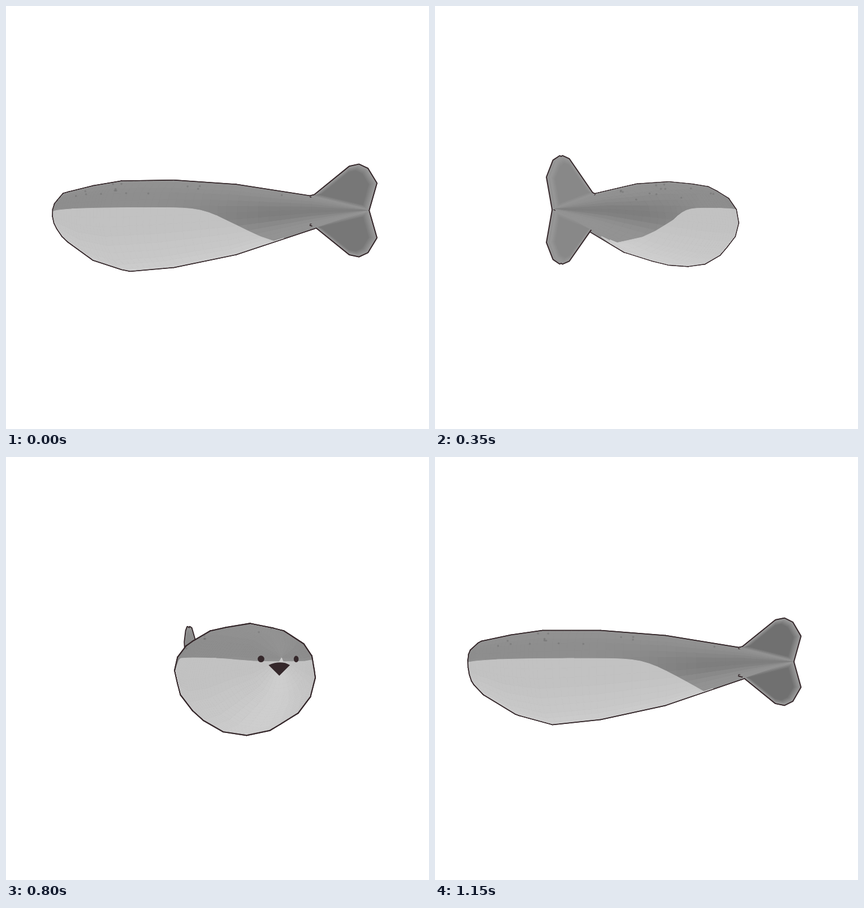
Recreate the animation shown at these times as an HTML page with a canvas. Size 748 by 748 pixels, loop 1200 ms.

```html
<!DOCTYPE html>
<html>
<head>
<meta charset="utf-8">
<style>
html, body { margin: 0; height: 100%; overflow: hidden; background: #fff; }
canvas { display: block; }
</style>
</head>
<body>
<canvas id="stage" width="748" height="748"></canvas>
<script>
const ctx = document.getElementById('stage').getContext('2d');
const LINE = '#35282b', CAMERA = 1061, CX = 374.5, CY = 368;

const mix = (a, b, f) => a + (b - a) * f;
const clamp = (x, lo, hi) => Math.max(lo, Math.min(hi, x));
const grey = g => `rgb(${g},${g},${g})`;

// Body profile, nose to tail: u, top y, bottom y
const RINGS = [[-312, -9, -9], [-307, -28, 36], [-292, -41, 54], [-240, -52, 88],
  [-184, -60, 104], [-82, -60, 95], [33, -51, 70], [168, -29, 24], [258, -7, -7]];
// Half of the tail fin: u, height above the fin's axis
const FIN = [[162, 24], [170, 26], [228, 73], [243, 76], [257, 69], [271, 45], [258.5, 0]];
const FINS = [-1, 1].map(side => FIN.map(([u, h]) => [u, -6 + side * h]));

// Point on the skin: t runs nose to tail, s from belly (0) to back (+-4), 16 sides
function skin(t, s) {
  const i = Math.min(Math.floor(t), 7), j = Math.floor(s * 2), q = Math.PI / 8;
  const [u, top, bottom] = RINGS[i].map((a, n) => mix(a, RINGS[i + 1][n], t - i));
  const c = mix(Math.cos(j * q), Math.cos((j + 1) * q), s * 2 - j);
  const n = mix(Math.sin(j * q), Math.sin((j + 1) * q), s * 2 - j);
  const h = (bottom - top) / 2;
  const slant = .21 * h * clamp((-82 - u) / 100, 0, 1);
  return [u + slant * (c + 1) / 2, 1.15 * h * n, (top + bottom) / 2 + h * c];
}

// Height of the border between back and belly
const edgeY = u => -11 + 8.8 * Math.log(1 + Math.exp((u + 4) / 16)) + 7 * Math.exp(-(u + 312) / 50);

function bellyEnd(t) {
  let lo = 0, hi = 4;
  for (let n = 0; n < 18; n++) {
    const m = (lo + hi) / 2, [u, , y] = skin(t, m);
    if (y > edgeY(u)) lo = m; else hi = m;
  }
  return lo < 0.01 ? 0 : lo;
}

const quad = (t0, t1, a0, a1, b0, b1) => [skin(t0, a0), skin(t1, a1), skin(t1, b1), skin(t0, b0)];

function backGrey(t, s) {
  const rear = clamp((t - 4.8) / 1.6, 0, 1), d = Math.abs(s) - 2.1;
  return 147 - 20 * rear * Math.exp(-d * d * 3) - 5 * Math.exp(-((d - .7) ** 2) * 3);
}

const T = 8, S = 4, back = [], belly = [], hull = [];
for (let k = 0; k < 8 * T; k++) {
  const t0 = k / T, t1 = (k + 1) / T, b0 = bellyEnd(t0), b1 = bellyEnd(t1);
  for (let j = -4 * S; j < 4 * S; j++) {
    const s0 = j / S, s1 = (j + 1) / S, m = (s0 + s1) / 2;
    const far = Math.max(Math.abs(s0), Math.abs(s1)), near = Math.min(Math.abs(s0), Math.abs(s1));
    if (far > Math.min(b0, b1))
      back.push({ pts: quad(t0, t1, s0, s0, s1, s1), color: grey(backGrey(t0, m)), t: t0, side: m });
    if (near < Math.max(b0, b1)) {
      const pts = quad(t0, t1, clamp(s0, -b0, b0), clamp(s0, -b1, b1),
        clamp(s1, -b0, b0), clamp(s1, -b1, b1));
      belly.push({ pts, color: grey(206 - 12 * clamp((Math.abs(m) - .2) / 1.7, 0, 1)) });
    }
  }
}
for (let t = 0; t < 8; t++)
  for (let s = -4; s < 4; s += .5) hull.push({ t, pts: quad(t, t + 1, s, s, s + .5, s + .5) });
const body = back.filter(c => c.t < 7), cone = back.filter(c => c.t >= 7);

let seed = 7;
const random = () => (seed = seed * 16807 % 2147483647) / 2147483647;
const specks = Array.from({ length: 30 }, (_, i) =>
  [mix(2.5, 6.9, random()), mix(2.8, 3.8, random()) * (i % 2 ? 1 : -1)]);

let cos, sin;

function project([u, v, y]) {
  const k = CAMERA / (CAMERA - u * sin - v * cos);
  return [CX + (u * cos - v * sin) * k, CY + y * k];
}

function area(p) {
  return p.reduce((sum, [x, y], i) => {
    const [x2, y2] = p[(i + 1) % p.length];
    return sum + x * y2 - x2 * y;
  }, 0) / 2;
}

function trace(p) {
  ctx.beginPath();
  p.forEach(([x, y]) => ctx.lineTo(x, y));
}

function paint(p, color, width) {
  trace(p);
  ctx.closePath();
  ctx.fillStyle = ctx.strokeStyle = color;
  ctx.lineWidth = width;
  ctx.fill();
  if (width) ctx.stroke();
}

function paintCells(list) {
  for (const c of list) {
    const p = c.pts.map(project);
    if (area(p) < -0.01) paint(p, c.color, 1);
  }
}

// Two thin sheets, the far one first
function paintFins() {
  const dark = 112 + 28 * Math.abs(sin), near = cos < 0 ? -2.5 : 2.5;
  for (const v of [-near, near]) for (const f of FINS) {
    trace(f.map(([u, y]) => project([u, v, y])));
    ctx.strokeStyle = LINE;
    ctx.lineWidth = 4;
    ctx.stroke();
  }
  for (const v of [-near, near]) for (const f of FINS) {
    const my = f[2][1] * .55;
    for (let n = 0; n < 7; n++) {
      const k = 1 - n * .04;
      paint(f.map(([u, y]) => project([mix(222, u, k), v, mix(my, y, k)])),
        grey(mix(152, dark, n / 6)), 0);
    }
  }
}

function facing([u, v], nu, nv) {
  const x = u * cos - v * sin, z = u * sin + v * cos;
  return (nu * sin + nv * cos) * (CAMERA - z) - (nu * cos - nv * sin) * x > 0;
}

function paintFace() {
  for (const side of [-1, 1]) {
    const u = -302, v = 24 * side, nu = -.94, nv = .34 * side;
    if (!facing([u, v], nu, nv)) continue;
    const eye = Array.from({ length: 20 }, (_, i) => {
      const a = i * Math.PI / 10, r = 4.2 * Math.cos(a);
      return project([u - nv * r, v + nu * r, -7.8 + 4.2 * Math.sin(a)]);
    });
    paint(eye, LINE, 0);
  }
  if (!facing([-305, 0], -1, 0)) return;
  const beak = [[-304, 0, 13.5]];
  for (let x = -1; x <= 1; x += .25) beak.push([-307 + 3 * x * x, 14.5 * x, -3.5 + 3.5 * x * x]);
  paint(beak.map(project), LINE, 0);
}

function paintSpecks() {
  ctx.fillStyle = 'rgba(90,90,90,.3)';
  for (const [t, s] of specks) {
    if (area(quad(t, t + .05, s, s, s + .05, s + .05).map(project)) > 0) continue;
    const [x, y] = project(skin(t, s));
    ctx.beginPath();
    ctx.arc(x, y, 1.8, 0, 7);
    ctx.fill();
  }
}

function draw(step) {
  const a = (15 + 15 * step) * Math.PI / 180;
  cos = Math.cos(a);
  sin = Math.sin(a);
  const tailNear = sin > -1e-6;
  const nearCone = cone.filter(c => c.side * cos > 0);
  ctx.fillStyle = '#fff';
  ctx.fillRect(0, 0, 748, 748);
  ctx.lineJoin = 'round';
  if (!tailNear) paintFins();
  for (const h of hull) if (tailNear || h.t < 7) paint(h.pts.map(project), LINE, 4.4 - .8 * sin);
  if (tailNear) {
    paintCells(body);
    paintCells(belly);
    paintCells(cone);
    paintSpecks();
    paintFins();
    paintCells(nearCone);
  } else {
    paintCells(nearCone);
    paintCells([...body].reverse());
    paintCells([...belly].reverse());
    paintSpecks();
    paintFace();
  }
}

let shown = -1;
function tick() {
  const step = Math.floor(performance.now() % 1200 / 50);
  if (step !== shown) draw(shown = step);
  requestAnimationFrame(tick);
}
tick();
</script>
</body>
</html>
```
